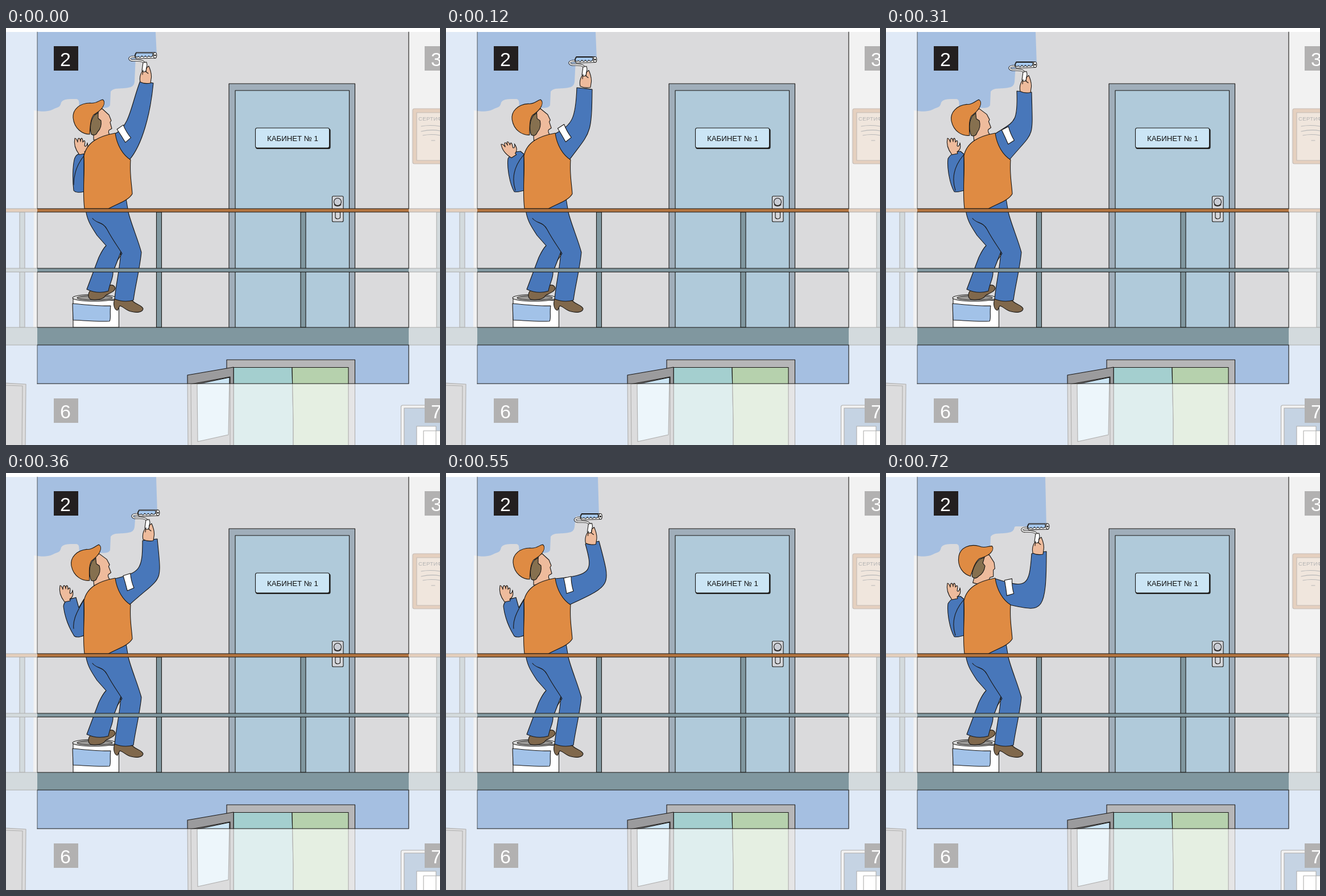
An HTML page for the animation above (0.84 s loop, 763 by 734 pixels).

```html
<!DOCTYPE html>
<html lang="ru">
<head>
<meta charset="utf-8">
<style>
html, body { margin: 0; width: 100%; height: 100%; overflow: hidden; background: #fff }
svg { display: block; stroke-linejoin: round; stroke-linecap: round }
text { font-family: "Liberation Sans", Arial, sans-serif; text-anchor: middle }
.ink { stroke: #181614; stroke-width: 1.1 }
.line { fill: none }
.wall { fill: #dadadc }
.paint { fill: #a5bfe1 }
.side { fill: #a8c5e8 }
.steel { fill: #80979f }
.vest { fill: #df8b43 }
.blue { fill: #4877ba }
.skin { fill: #eebb9c }
.shoe { fill: #80684c }
.white { fill: #fff }
.frame { fill: #a0aeba }
.door { fill: #b0cada }
.grey { fill: #b6b6b8 }
.dark { fill: #9b9b9d }
.sign { fill: #cbe5f5 }
.num rect { fill: #231f20 }
.num text { fill: #fff; font-size: 34px }
</style>
</head>
<body>
<svg width="763" height="734" viewBox="0 0 763 734">
  <!-- wall and paint -->
  <path class="wall" d="M0 7H763V527H0Z"/>
  <path class="side" d="M0 7H56V146L49 145V318L48 527H0Z"/>
  <path id="coat" class="paint"/>
  <path class="side" d="M0 558H763V734H0Z"/>
  <path class="paint" d="M55 558H708V626H55Z"/>

  <!-- office door -->
  <g class="ink">
    <path class="frame" d="M392 527V98H613.500V527"/>
    <path class="door" d="M403 527V110H603.500V527"/>
    <rect x="439.500" y="177.500" width="130.500" height="35" rx="3" fill="#333"/>
    <rect class="sign" x="438.500" y="176" width="130" height="35" rx="3"/>
    <rect x="573.500" y="296" width="19.500" height="45" rx="2" fill="#d3d5da"/>
    <circle cx="583" cy="306" r="6.500" fill="#c9ccd4"/>
    <path class="line" d="M579 324V334Q583 338 587.500 334V324ZM577 311Q583 316 589 311"/>
  </g>
  <text x="504" y="199" font-size="13.200" fill="#111">КАБИНЕТ № 1</text>

  <!-- certificate on the next wall -->
  <g stroke="#5c4230" stroke-width="1.200">
    <rect x="715" y="142" width="70" height="97" rx="3" fill="#b57948"/>
    <rect x="722" y="149" width="60" height="84" fill="#d4b79e"/>
    <path class="line" stroke="#333" d="M730 173Q745 170 763 173M730 182Q748 178 763 181M733 189Q748 186 763 189M748 198H754"/>
  </g>
  <text x="725" y="163" font-size="9.500" fill="#222" style="text-anchor:start;letter-spacing:.4px">СЕРТИФИКАТ</text>

  <!-- bucket -->
  <g class="ink">
    <path class="white" d="M118 475V527H198.500V480Z"/>
    <ellipse cx="155" cy="475" rx="38" ry="6" fill="#ddd"/>
    <ellipse cx="156" cy="475" rx="31" ry="4" fill="#9b9996"/>
    <path d="M117 485C140 487 165 490 184 489C182 500 185 512 182 516C160 517 140 515 118 514Z" fill="#a2c2e8"/>
  </g>

  <!-- painter -->
  <g class="ink">
    <path class="shoe" d="M148 462C143 469 144 478 152 478C165 479 172 476 175 471C181 466 190 466 192 458C190 450 182 452 176 455Z"/>
    <path class="shoe" d="M191 477C188 486 190 496 196 497L200 489C206 490 212 498 220 499C230 502 241 500 241 494C238 487 230 488 222 480Z"/>
    <path class="blue" d="M140 318C142 340 152 352 160 365L176 383C170 389 167 396 163 404L142 460C155 466 167 467 180 463C182 450 189 440 188 430L202 394C200 425 193 452 191 477C203 482 214 482 224 479C227 455 235 425 238 395C232 372 220 345 215 324L211 300L180 310Z"/>
    <path class="line" d="M152 335C160 345 170 340 178 355C187 372 196 384 204 397L196 409"/>
    <path id="backSleeve" class="blue"/>
    <path id="crease" class="line"/>
    <path id="backHand" class="skin" d="M103 227C96 218 93 207 95 198C98 198 99 202 100 205C100 196 104 196 105 204C105 195 109 197 109 205C112 200 114 202 112 211C113 214 117 211 117 206C119 215 117 219 112 222L113 225Z"/>
    <g id="head">
      <path class="skin" d="M154 197V180L163 145L169 142L181 153L185 163L183 166L186 177L181 180Q179 183 183 190V197Z"/>
      <path fill="#86704f" d="M156 153C148 162 147 178 150 187C155 190 159 188 161 183C166 178 168 170 167 163L162 159V149Z"/>
      <path class="vest" d="M118 158C117 143 130 132 148 132C158 134 164 127 170 126C175 130 172 137 168 142C163 148 158 150 154 153C148 161 148 175 147 187C135 187 120 178 118 158Z"/>
    </g>
    <path id="sleeve" class="blue"/>
    <path id="band" class="white" d="M-9 -12L4 -15Q4 -2 8 11L-4 15Q-6 2 -9 -12Z"/>
    <path class="vest" d="M192 185C195 207 206 224 219 232C217 258 221 274 222 292C215 304 198 308 180 318H138C134 285 139 255 137 225C142 200 165 190 192 185Z"/>
    <g id="tool">
      <path class="line" stroke-width="3.800" d="M243 61C237 55 229 58 221 57C214 55 217 49 229 51"/>
      <path class="line" style="stroke:#e9e9e9;stroke-width:2.200" d="M243 61C237 55 229 58 221 57C214 55 217 49 229 51"/>
      <path class="white" d="M229 43L261 43Q266 47 263 53L229 54Q224 49 229 43Z"/>
      <path fill="#a4c6ec" d="M229 44H258V49Q254 53 251 49Q248 54 245 49Q242 54 239 49Q236 54 233 50Q229 53 227 49Z"/>
      <ellipse class="white" cx="262" cy="48" rx="2.800" ry="5"/>
      <circle cx="262" cy="48" r="1"/>
      <path class="skin" d="M236 95C234 86 237 79 241 74L247 70L251 67C254 74 257 82 255 90L254 97Q244 99 236 95Z"/>
      <path class="white" d="M241 61L247 60L248 65L246 76Q242 79 239 75Z"/>
      <path class="line" d="M241 74L240 82M247 70L246 77L250 80"/>
    </g>
  </g>

  <!-- balcony -->
  <g class="ink">
    <path class="steel" d="M24 324H33V527H24ZM264.500 324H273.500V527H264.500ZM518 324H527V527H518ZM757 324H767V527H757Z"/>
    <path class="steel" d="M-2 423H767V429.500H-2ZM-2 527H767V558H-2Z"/>
    <path fill="#b47540" d="M-2 318H767V324H-2Z"/>
  </g>

  <!-- lower floor -->
  <g class="ink">
    <path class="grey" d="M388 736V584H613.500V736Z"/>
    <path fill="#a4cfcf" d="M400 736V597.500H503L505 690V736Z"/>
    <path fill="#b6d1ad" d="M503 597.500H602V736H505V690Z"/>
    <path class="dark" d="M319 611L400 597V736H320Z"/>
    <path class="dark" d="M325 627L394 614V736H326Z"/>
    <path class="sign" d="M336 627L393 615L391 716L337 728Z"/>
    <path class="dark" d="M-2 625L35 627L34 736H-2Z"/>
    <path class="line" d="M-2 629L29 630L28 736"/>
    <rect class="wall" x="694.500" y="664" width="90" height="90" rx="3"/>
    <path fill="#5981af" d="M700 736V669H767V736Z"/>
    <path class="white" d="M722 736V701H756V736ZM734 736V709H767V736Z"/>
  </g>

  <!-- dimmed neighbours -->
  <g id="numbers"></g>
  <path fill="#fff" opacity=".65" d="M0 7H55V626H708V7H763V734H0Z"/>
  <path class="ink line" d="M55 626H708M708 7V318M708 324V423M708 430V527M708 558V626"/>
  <path class="ink line" opacity=".6" d="M55 7V318M55 324V423M55 430V527M55 558V626"/>
  <g class="num"><rect x="84" y="32" width="43" height="43"/><text x="104.500" y="67">2</text></g>
</svg>
<script>
const el = id => document.getElementById(id);
const set = (id, name, value) => el(id).setAttribute(name, value);

el('numbers').innerHTML = [[3, 736, 32], [6, 84, 652], [7, 736, 652]].map(([n, x, y]) =>
  `<g class="num"><rect x="${x}" y="${y}" width="43" height="43"/><text x="${x + 20.5}" y="${y + 35}">${n}</text></g>`).join('');

// Back arm: sleeve, its crease and the place of the hand.
const high = {
  sleeve: 'M109 230C114 221 123 217 131 217L137 222V286C131 287 126 290 120 288C112 275 107 245 109 230Z',
  crease: 'M136 224C120 243 115 264 122 286',
  hand: 'translate(13 -4)'
};
const back = {
  high,
  near: {
    sleeve: 'M120 232C122 222 130 220 137 220V288C130 290 122 290 119 286C117 270 117 245 120 232Z',
    crease: 'M137 225C125 240 119 258 119 276',
    hand: 'translate(26 -4)'
  },
  turned: { ...high, hand: 'translate(7 1) rotate(-22 107 214)' },
  far: {
    sleeve: 'M101 235C102 222 115 222 123 219L128 237L137 222V286C130 289 124 290 120 287C108 268 103 250 101 235Z',
    crease: 'M137 223C124 245 117 260 119 274',
    hand: ''
  }
};

// inner runs from shoulder to wrist, outer from wrist to elbow.
const pose = (tool, edge, head, arm, band, inner, outer) => ({ tool, edge, head, arm, band, inner, outer });
const poses = [
  pose([0, 0], 263, 0, 'near', [208, 186, -22], '218 172 220 135 236 93', '259 97C254 150 240 205'),
  pose([0, 7.5], 263, -3.5, 'turned', [209, 185, -20], '222 170 228 160 230 105', '257 108C256 190 254 182'),
  pose([0, 16.5], 263, -6, 'high', [215, 189, -14], '226 164 232 168 230 111', '256 113C258 200 262 178'),
  pose([5, 22], 264, -6, 'far', [216, 192, -5], '236 175 240 170 240 119', '266 116C274 200 276 178'),
  pose([9.5, 28.5], 267, 0, 'far', [216, 197, 0], '258 180 258 172 245 125', '269 120C290 200 294 196'),
  pose([11.5, 38], 270, 9, 'far', [216, 198, 0], '258 186 260 190 251 133', '273 129C290 230 294 216'),
  pose([22, 46], 280, 15, 'high', [217, 201, 2], '248 204 252 200 256 142', '282 138C282 250 274 244')
];

function draw() {
  const p = poses[Math.floor(performance.now() / 120) % poses.length];
  const [dx, dy] = p.tool, arm = back[p.arm];
  set('tool', 'transform', `translate(${dx} ${dy})`);
  set('head', 'transform', `rotate(${p.head} 168 190)`);
  set('band', 'transform', `translate(${p.band[0]} ${p.band[1]}) rotate(${p.band[2]})`);
  set('sleeve', 'd', `M192 186C${p.inner}L${p.outer} 217 232L194 222Z`);
  set('backSleeve', 'd', arm.sleeve);
  set('crease', 'd', arm.crease);
  set('backHand', 'transform', arm.hand);
  set('coat', 'd', `M55 7H${p.edge}L${p.edge + 2} ${48 + dy}H228L226 95Q225 104 215 105
    C200 108 190 104 184 112L183 136C180 142 170 141 160 140L134 146C124 142 133 127 124 125
    C113 125 101 124 97 131C95 140 92 139 85 142C75 148 62 147 55 146Z`);
  requestAnimationFrame(draw);
}
draw();
</script>
</body>
</html>
```
